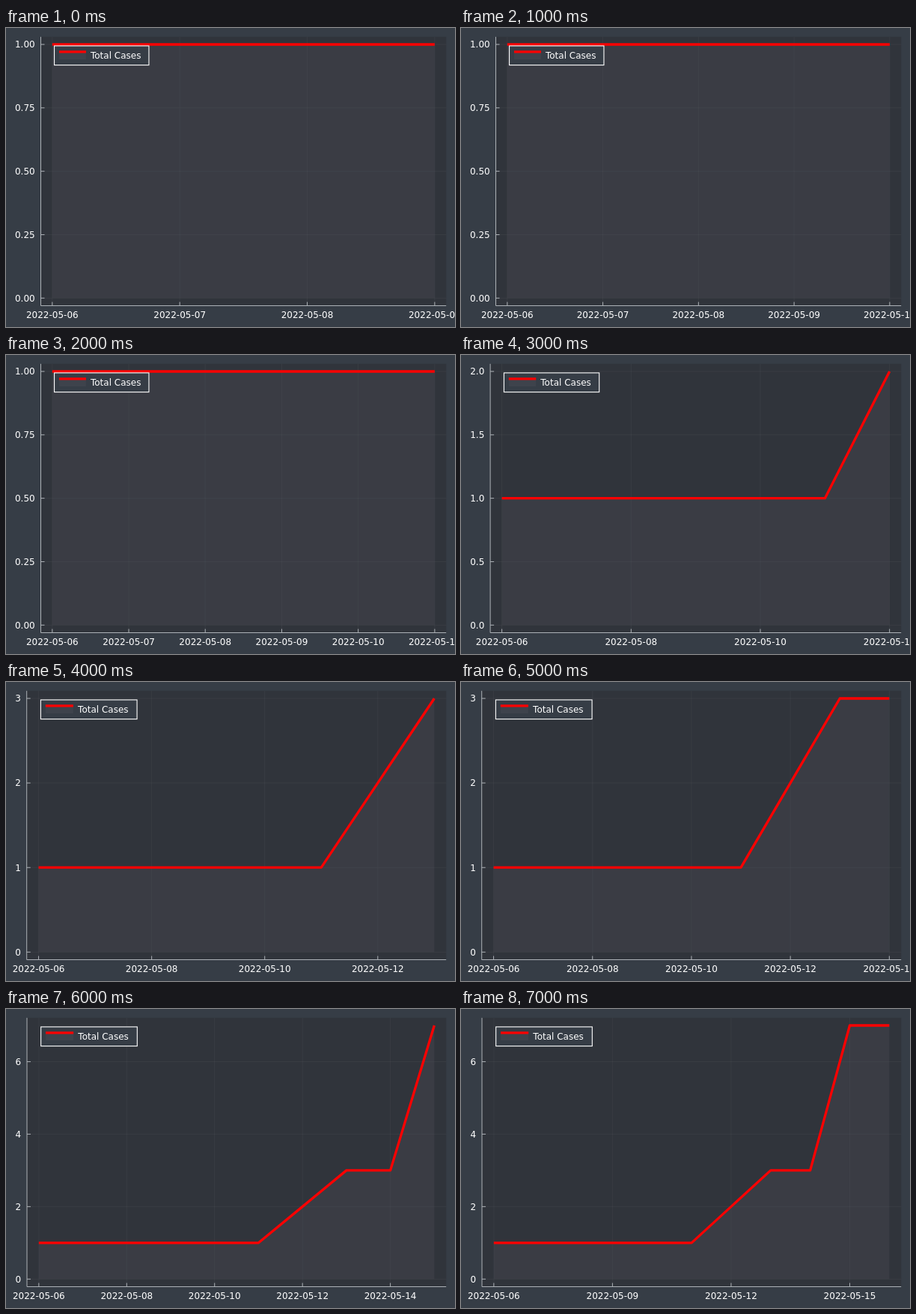
These frames come from a looping animation (600 by 400 pixels, 8000 ms). An HTML page:

```html
<!DOCTYPE html>
<html lang="en">
<head>
<meta charset="utf-8">
<title>Total Cases</title>
<style>
  html, body { margin: 0; width: 100%; height: 100%; overflow: hidden; background: #363d46; }
  svg { display: block; width: 600px; height: 400px; }
  text { font: 12px "DejaVu Sans", sans-serif; fill: #fff; }
  .grid { stroke: #adb2b7; stroke-opacity: .065; }
  .axis { stroke: #adb2b7; fill: none; }
  .area { fill: #52525a; fill-opacity: .3; }
  .line { stroke: #f00; stroke-width: 3.3; fill: none; stroke-linejoin: round; }
  .box { fill: #363d46; stroke: #fff; stroke-width: 1.1; }
</style>
</head>
<body>
<svg id="chart" viewBox="0 0 600 400"></svg>
<script>
const chart = document.getElementById('chart');
const STEP = 1000;
const TOP = 11.8, BOTTOM = 371.5, RIGHT = 588.2;
const PAD = 0.03 / 1.06;
const cases = [1, 1, 1, 1, 1, 1, 2, 3, 3, 7, 7];
const firstDay = 6;

// axis left edge, day step, value step, decimals
const scales = [
  [46.5, 1, 0.25, 2],
  [46.5, 1, 0.25, 2],
  [46.5, 1, 0.25, 2],
  [39.1, 2, 0.5, 1],
  [27.7, 2, 1, 0],
  [27.7, 2, 1, 0],
  [28, 2, 2, 0],
  [28, 3, 2, 0]
];

const path = (cls, d) => `<path class="${cls}" d="${d}"/>`;
const rect = (cls, x, y, w, h) =>
  `<rect class="${cls}" x="${x}" y="${y}" width="${w}" height="${h}"/>`;
const label = (x, y, anchor, s) =>
  `<text x="${x}" y="${y}" text-anchor="${anchor}">${s}</text>`;

function legend(left, width) {
  const x = left + width / 30;
  const grow = width - 541.7;
  const len = 36 + grow * 0.06;
  return rect('box', x, 23.9, 126.4 + grow * 0.122, 25.7) +
    rect('area', x + 6.4, 32, len, 10) +
    path('line', `M${x + 6.4} 31.9h${len}`) +
    label(x + 48.4 + grow * 0.07, 41.2, 'start', 'Total Cases');
}

function draw(index) {
  const [left, dayStep, valueStep, digits] = scales[index];
  const data = cases.slice(0, index + 4);
  const last = data.length - 1;
  const max = data[last];
  const width = RIGHT - left, height = BOTTOM - TOP;
  const px = i => left + width * (PAD + (1 - 2 * PAD) * i / last);
  const py = v => BOTTOM - height * (PAD + (1 - 2 * PAD) * v / max);

  let grid = '', ticks = '', labels = '';
  for (let i = 0; i <= last; i += dayStep) {
    const x = px(i);
    grid += `M${x} ${TOP}V${BOTTOM}`;
    ticks += `M${x} ${BOTTOM}v-5`;
    const day = String(firstDay + i).padStart(2, '0');
    labels += label(x, 387.6, 'middle', '2022-05-' + day);
  }
  for (let v = 0; v <= max; v += valueStep) {
    const y = py(v);
    grid += `M${left} ${y}H${RIGHT}`;
    ticks += `M${left} ${y}h5`;
    labels += label(left - 7.8, y + 4.4, 'end', v.toFixed(digits));
  }

  const curve = 'M' + data.map((v, i) => `${px(i)} ${py(v)}`).join('L');
  chart.innerHTML =
    `<rect x="${left}" y="${TOP}" width="${width}" height="${height}" fill="#30343b"/>` +
    path('grid', grid) +
    path('axis', `M${left} ${TOP}V${BOTTOM}H${RIGHT}` + ticks) +
    labels +
    path('area', `${curve}V${py(0)}H${px(0)}Z`) +
    path('line', curve) +
    legend(left, width);
}

let shown = -1;
const start = performance.now();
function tick(now) {
  const index = Math.floor(Math.max(0, now - start) / STEP) % scales.length;
  if (index !== shown) draw(shown = index);
  requestAnimationFrame(tick);
}
tick(start);
</script>
</body>
</html>
```
